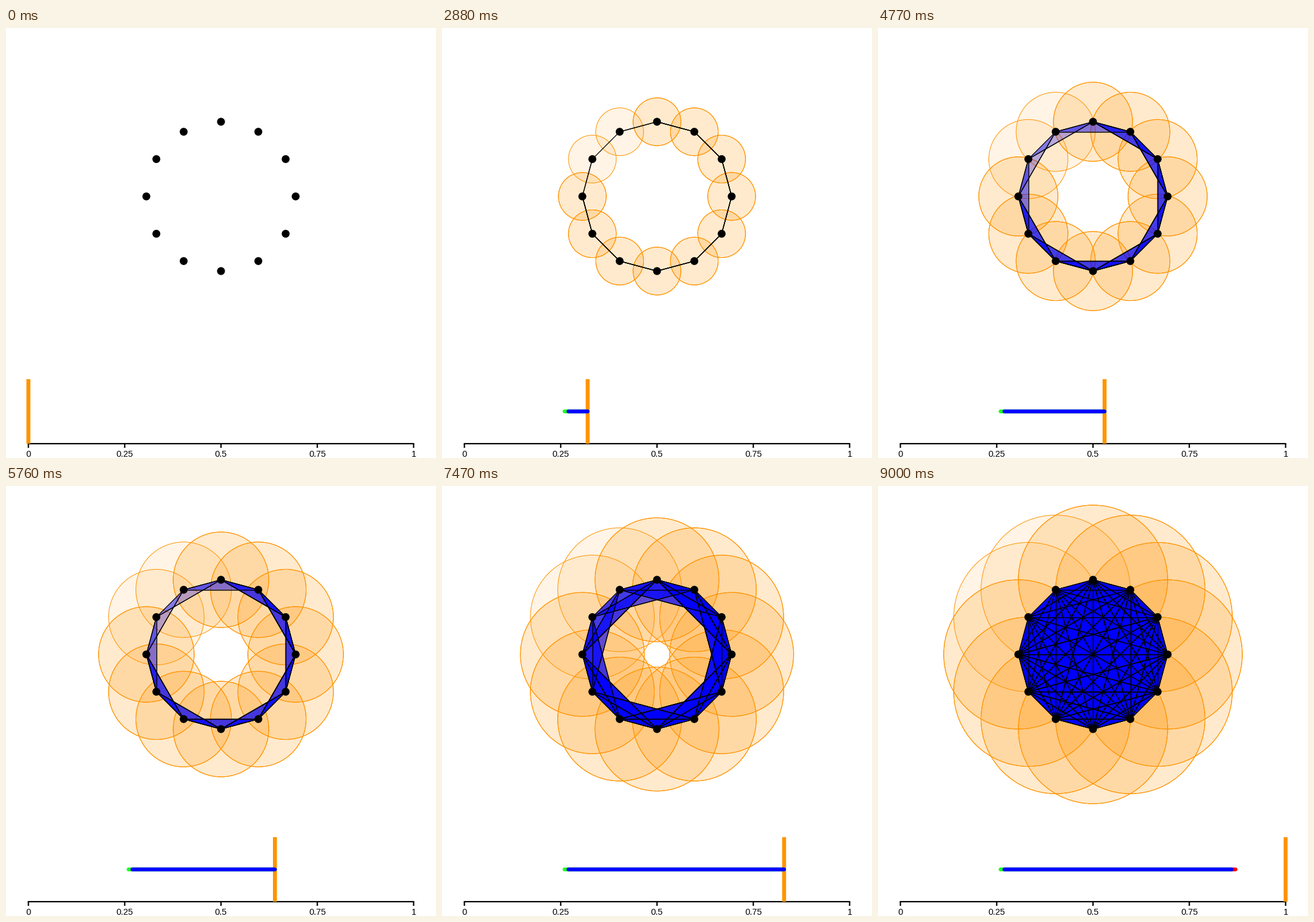
A matplotlib script that plays this animation: 720 by 720 pixels, repeating every 9090 ms.

```python
from itertools import combinations

import matplotlib.pyplot as plt
import numpy as np
from matplotlib.animation import FuncAnimation
from matplotlib.collections import LineCollection, PolyCollection
from matplotlib.patches import Circle

SIZE = 720
STEPS = 100
CENTER = np.array([360, 282])
RING = 125
ORANGE = "#ff9400"
FILL_ALPHA = 0.15
BIRTH, DEATH = 26, 87

# Walking the ring in 22 steps visits ten of the twelve places twice.
N = 12
WALK = [(6 + k) % N for k in range(22)]
COUNT = [WALK.count(i) for i in range(N)]


def place(i):
    a = 2 * np.pi * i / N
    return CENTER + RING * np.array([np.cos(a), -np.sin(a)])


def reach(*ids):
    """Scale at which all the given points are pairwise connected."""
    return max(abs(np.sin(np.pi * (i - j) / N))
               for i, j in combinations(ids, 2))


def axis_x(t):
    return 37.5 + 645 * t


POINTS = [place(i) for i in range(N)]

edges = [(reach(i, j), (POINTS[i], POINTS[j]))
         for i, j in combinations(range(N), 2)
         for _ in range(COUNT[i] * COUNT[j])]

triangles = []
for ids in combinations(range(N), 3):
    copies = np.prod([COUNT[i] for i in ids])
    alpha = 1 - (1 - FILL_ALPHA) ** copies
    triangles.append((reach(*ids), [POINTS[i] for i in ids], (0, 0, 1, alpha)))

fig = plt.figure(figsize=(SIZE / 72, SIZE / 72), dpi=72, facecolor="white")
ax = fig.add_axes([0, 0, 1, 1])
ax.set_xlim(0, SIZE)
ax.set_ylim(SIZE, 0)
ax.axis("off")


def line(xs, ys, color, width, z, cap="butt"):
    artist, = ax.plot(xs, ys, color=color, lw=width, zorder=z,
                      solid_capstyle=cap)
    artist.set_snap(False)
    return artist


# Growing discs, filled simplices and the points themselves
discs = []
for k, i in enumerate(WALK):
    disc = Circle(POINTS[i], 0, fc=(1, 0.58, 0, 0.1), ec=ORANGE, lw=1,
                  zorder=1 + k / 100)
    discs.append(ax.add_patch(disc))

faces = ax.add_collection(PolyCollection([], linewidths=0, zorder=2),
                          autolim=False)
links = ax.add_collection(
    LineCollection([], colors="black", linewidths=1.25, zorder=3),
    autolim=False)
for p in POINTS:
    ax.add_patch(Circle(p, 6.6, fc="black", lw=0, zorder=4))

# Scale
line([axis_x(0) - 1, axis_x(1) + 1], [696, 696], "black", 2.2, 5)
for label in ("0", "0.25", "0.5", "0.75", "1"):
    x = axis_x(float(label))
    line([x, x], [696, 703], "black", 2.2, 5)
    ax.text(x, 718, label, family="Liberation Sans", size=14.6,
            ha="center", va="baseline", zorder=5)

marker = line([], [], ORANGE, 6.6, 6)
birth = line([], [], "#1eff1e", 6.5, 7, "round")
death = line([], [], "red", 6.5, 7, "round")
life = line([], [], "blue", 6.5, 8, "round")


def set_span(artist, start, end, shown):
    if shown:
        artist.set_data([axis_x(start / STEPS), axis_x(end / STEPS)],
                        [642, 642])
    else:
        artist.set_data([], [])


def update(step):
    t = step / STEPS
    limit = t + 1e-9

    for disc in discs:
        disc.set_radius(RING * t)
        disc.set_visible(step > 0)

    filled = [tri for tri in triangles if tri[0] <= limit]
    faces.set_verts([tri[1] for tri in filled])
    faces.set_facecolor([tri[2] for tri in filled] or "none")
    links.set_segments([seg for r, seg in edges if r <= limit])

    marker.set_data([axis_x(t)] * 2, [588, 696])
    last = min(step, DEATH - 1)
    set_span(birth, BIRTH, last, step >= BIRTH)
    set_span(life, BIRTH + 1, last, step > BIRTH)
    set_span(death, DEATH - 1, DEATH, step >= DEATH)
    return [*discs, faces, links, marker, birth, life, death]


anim = FuncAnimation(fig, update, frames=STEPS + 1, interval=90,
                     repeat=True, repeat_delay=0, blit=False)
plt.show()
```
